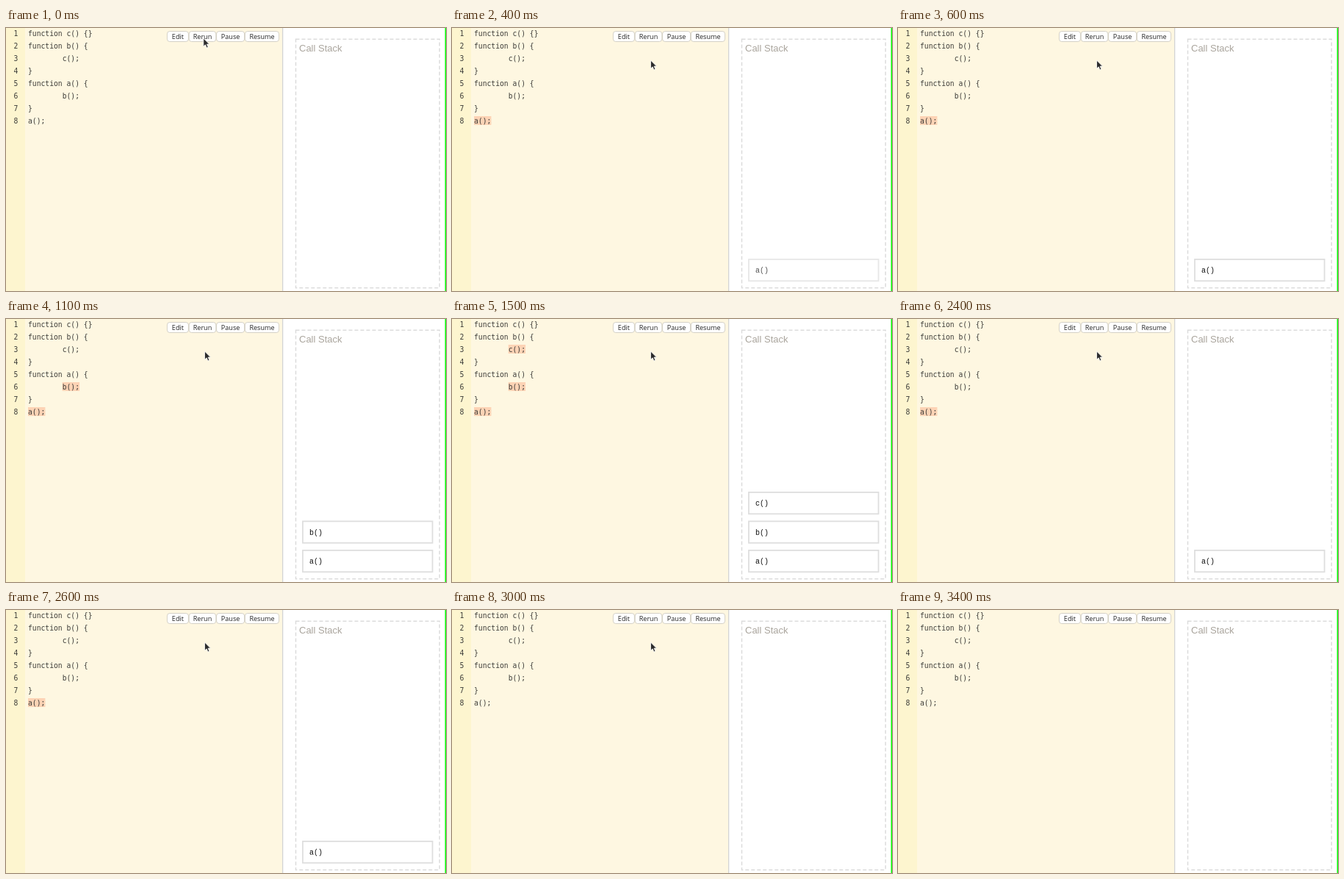
These frames come from a looping animation (599x358 px, 3.5 s). An HTML page:

```html
<!DOCTYPE html>
<html lang="en">
<head>
<meta charset="utf-8">
<title>Call stack</title>
<style>
  html, body { margin: 0; width: 100%; height: 100%; overflow: hidden; background: #fff; }
  svg { display: block; }
  .code { font: 9.7px "DejaVu Sans Mono", monospace; fill: #3c3c38; }
  .num { text-anchor: end; }
  .button rect { fill: #fff; stroke: #cbc7bc; stroke-width: .8; }
  .button text { font: 9.1px "Open Sans", sans-serif; fill: #222; text-anchor: middle; }
  .title { font: 13px "Liberation Sans", Arial, sans-serif; fill: #aaa59d; }
  .call rect { fill: #fff; stroke: #dedede; stroke-width: 1.8; }
  .call text { font: 10px "Liberation Mono", monospace; fill: #111; }
  .mark { fill: #fdd3b5; }
</style>
</head>
<body>
<svg id="stage" width="599" height="358" viewBox="0 0 599 358">
  <rect width="377" height="358" fill="#fef7e1"/>
  <rect width="26" height="358" fill="#fdf5cf"/>
  <rect x="376" width="1.3" height="358" fill="#d4d4d4"/>
  <rect x="597.6" width="1.4" height="358" fill="#0f0"/>
  <rect x="394.5" y="15.3" width="195.7" height="338.4" fill="none" stroke="#dcdcdc" stroke-width="1.5" stroke-dasharray="5 3"/>
  <text class="title" x="399" y="32">Call Stack</text>
  <g id="marks"></g>
  <g id="source"></g>
  <g id="buttons"></g>
  <g id="calls"></g>
  <path id="cursor" d="M0 0V11.2L2.6 8.8L4.4 13L6.4 12.1L4.6 8.1H8Z" fill="#2b2b2b" stroke="#fff" stroke-width=".8"/>
</svg>
<script>
const LOOP = 3500, STEP = 100;
const $ = id => document.getElementById(id);

function add(parent, tag, attrs, text = "") {
  const el = document.createElementNS("http://www.w3.org/2000/svg", tag);
  for (const key in attrs) el.setAttribute(key, attrs[key]);
  el.textContent = text;
  return parent.appendChild(el);
}

const lines = ["function c() {}", "function b() {", "\tc();", "}",
               "function a() {", "\tb();", "}", "a();"];
lines.forEach((line, i) => {
  const y = 10.7 + i * 17;
  add($("source"), "text", { class: "code num", x: 16.3, y }, i + 1);
  add($("source"), "text", { class: "code", x: line[0] === "\t" ? 76.7 : 30, y }, line.trim());
});

[["Edit", 219.4, 29], ["Rerun", 249.2, 36.6], ["Pause", 286.6, 38], ["Resume", 325.4, 46.2]]
  .forEach(([label, x, width]) => {
    const g = add($("buttons"), "g", { class: "button" });
    add(g, "rect", { x, y: 4.5, width, height: 14, rx: 3.5 });
    add(g, "text", { x: x + width / 2, y: 14.8 }, label);
  });

// Each call: name, highlighted code position, time pushed, time popped
const calls = [["a()", 30, 126, 300, 2800], ["b()", 76.7, 92, 800, 2300], ["c()", 76.7, 41, 1300, 1800]]
  .map(([name, x, y, start, end], i) => {
    const top = 314.9 - i * 39.5;
    const box = add($("calls"), "g", { class: "call" });
    add(box, "rect", { x: 404, y: top, width: 176.6, height: 29.4 });
    add(box, "text", { x: 413, y: top + 18.3 }, name);
    const mark = add($("marks"), "rect", { class: "mark", x, y: y - 6, width: 23.4, height: 12 });
    return { box, mark, start, end };
  });

const clamp = v => Math.max(0, Math.min(1, v));

function draw(now) {
  const t = Math.floor(now % LOOP / STEP) * STEP;
  for (const { box, mark, start, end } of calls) {
    const fadeIn = clamp((t - start + 80) / 250);
    const fadeOut = clamp((end + STEP - t) / 200);
    box.setAttribute("opacity", t < start ? 0 : Math.min(fadeIn, fadeOut));
    mark.setAttribute("opacity", t >= start && t < end ? 1 : 0);
  }
  const p = clamp(t / 400), ease = p * p * (3 - 2 * p);
  $("cursor").setAttribute("transform", `translate(${268.8 + 1.7 * ease} ${14 + 30 * ease})`);
  $("cursor").setAttribute("opacity", t < 3200 ? 1 : 0);
}

let begin;
function tick(now) {
  begin ??= now;
  draw(now - begin);
  requestAnimationFrame(tick);
}
draw(0);
requestAnimationFrame(tick);
</script>
</body>
</html>
```
